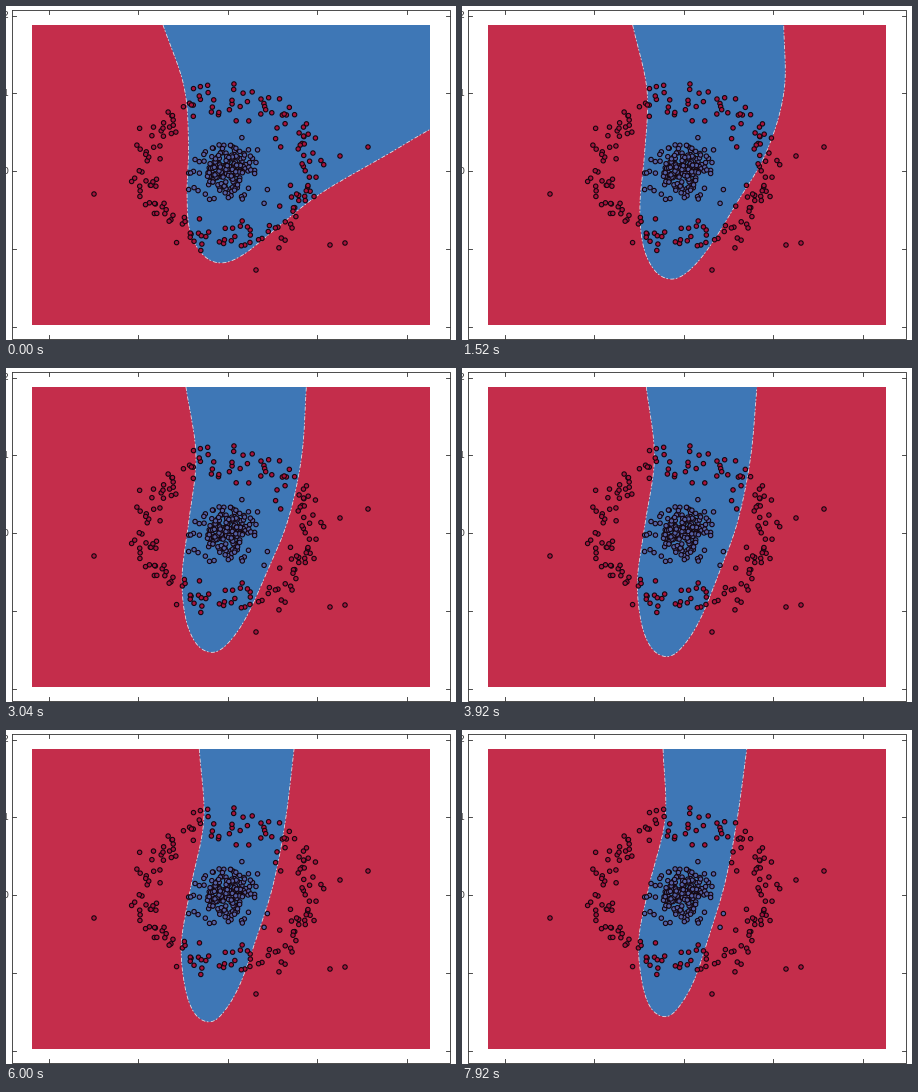
A matplotlib script that plays this animation: 450 by 334 pixels, repeating every 8000 ms.

```python
import numpy as np
import matplotlib.pyplot as plt
from matplotlib.animation import FuncAnimation
from matplotlib.patches import Polygon, Rectangle

W, H, DPI = 450, 334, 100
FRAMES, STEP = 100, 80
PX = 72 / DPI
LEFT, RIGHT, TOP, BOTTOM = 26, 424, 19, 319
CENTER = np.array([222, 163])
UNIT = np.array([89.5, 78])  # pixels per data unit
RED, BLUE, INK = "#c42d4b", "#3e77b6", "#3c3c3c"
DOT_RED, DOT_BLUE = "#a8123c", "#5460a6"
plt.rcParams["font.family"] = "DejaVu Sans"

# Boundary x, from top left round the tip to top right: first pose and limit
START = np.array([157, 178, 182.5, 181, 184, 197, 215, 237, 267, 315, 399, 490, 530])
LIMIT = np.array([234, 222, 192, 174, 177, 183, 196, 207, 221, 233, 247, 260, 274])
ALONG = np.linspace(0, 1, len(START))
RATE = 0.17 + 2.7 * ALONG ** 6  # the right side settles much faster


def smooth(at, knots, values):
    """Cubic Hermite curve through values at the given knots."""
    slopes = np.gradient(values, knots)
    i = np.clip(np.searchsorted(knots, at, side="right") - 1, 0, len(knots) - 2)
    span = knots[i + 1] - knots[i]
    u = (at - knots[i]) / span
    return ((1 + 2 * u) * (1 - u) ** 2 * values[i]
            + u * (1 - u) ** 2 * span * slopes[i]
            + u ** 2 * (3 - 2 * u) * values[i + 1]
            + u ** 2 * (u - 1) * span * slopes[i + 1])


def boundary(t):
    """Outline of the blue region t seconds into the loop."""
    xs = LIMIT + (START - LIMIT) / (1 + RATE * t)
    xs -= 3.5 * (1 - ALONG) * t * (8 - t) / 16
    depth = 292 - 1.08 * (t - 5.7) ** 2
    along = np.linspace(0, 1, 240)
    y = TOP + (depth - TOP) * np.sin(np.pi * along)
    return np.column_stack([smooth(along, ALONG, xs), y])


def scatter_points():
    rng = np.random.default_rng(12)
    turn = np.linspace(0, 2 * np.pi, 175, endpoint=False)
    circle = 0.91 * np.column_stack([np.cos(turn), np.sin(turn)])
    ring = CENTER + UNIT * (circle + rng.normal(0, 0.1, circle.shape))
    strays = [(88, 188), (362, 141), (334, 150), (339, 237), (324, 239), (250, 264)]
    core = CENTER + UNIT * np.clip(rng.normal(0, 0.165, (190, 2)), -0.44, 0.44)
    points = np.vstack([ring, strays, core])
    colors = np.repeat([DOT_RED, DOT_BLUE], [len(ring) + len(strays), len(core)])
    order = rng.permutation(len(points))
    return points[order], colors[order]


fig = plt.figure(figsize=(W / DPI, H / DPI), dpi=DPI, facecolor="white")
ax = fig.add_axes([0, 0, 1, 1])
ax.set(xlim=(0, W), ylim=(H, 0))
ax.axis("off")


def line(xs, ys):
    ax.plot(xs, ys, color=INK, lw=0.9 * PX)


x0, x1, y0, y1 = 5.5, 444, 3.5, 333
line([x0, x1, x1, x0, x0], [y0, y0, y1, y1, y0])
for k in range(5):
    x, y = 42.7 + 89.5 * k, 9.5 + 77.9 * k
    for edge_y, inward in ((y0, 4), (y1, -4)):
        line([x, x], [edge_y, edge_y + inward])
    for edge_x, inward in ((x0, 4), (x1, -4)):
        line([edge_x, edge_x + inward], [y, y])
    if k < 3:
        ax.text(2.5, y, str(2 - k), size=9.5 * PX, color=INK,
                ha="right", va="center")

plane = ax.add_patch(Rectangle((LEFT, TOP), RIGHT - LEFT, BOTTOM - TOP,
                               fc=RED, lw=0, zorder=1))
region = ax.add_patch(Polygon(boundary(0), fc=BLUE, lw=0, zorder=2))
edge, = ax.plot([], [], color="#e4dfe6", lw=0.8 * PX, zorder=3,
                dashes=(5, 2, 2, 3))
for artist in (region, edge):
    artist.set_clip_path(plane)

points, colors = scatter_points()
ax.scatter(*points.T, s=(4.4 * PX) ** 2, c=colors, edgecolors="#14060f",
           linewidths=1.1 * PX, zorder=4)


def update(frame):
    curve = boundary(frame * STEP / 1000)
    region.set_xy(curve)
    edge.set_data(*curve.T)
    return region, edge


anim = FuncAnimation(fig, update, frames=FRAMES, interval=STEP,
                     repeat=True, repeat_delay=0)
plt.show()
```
